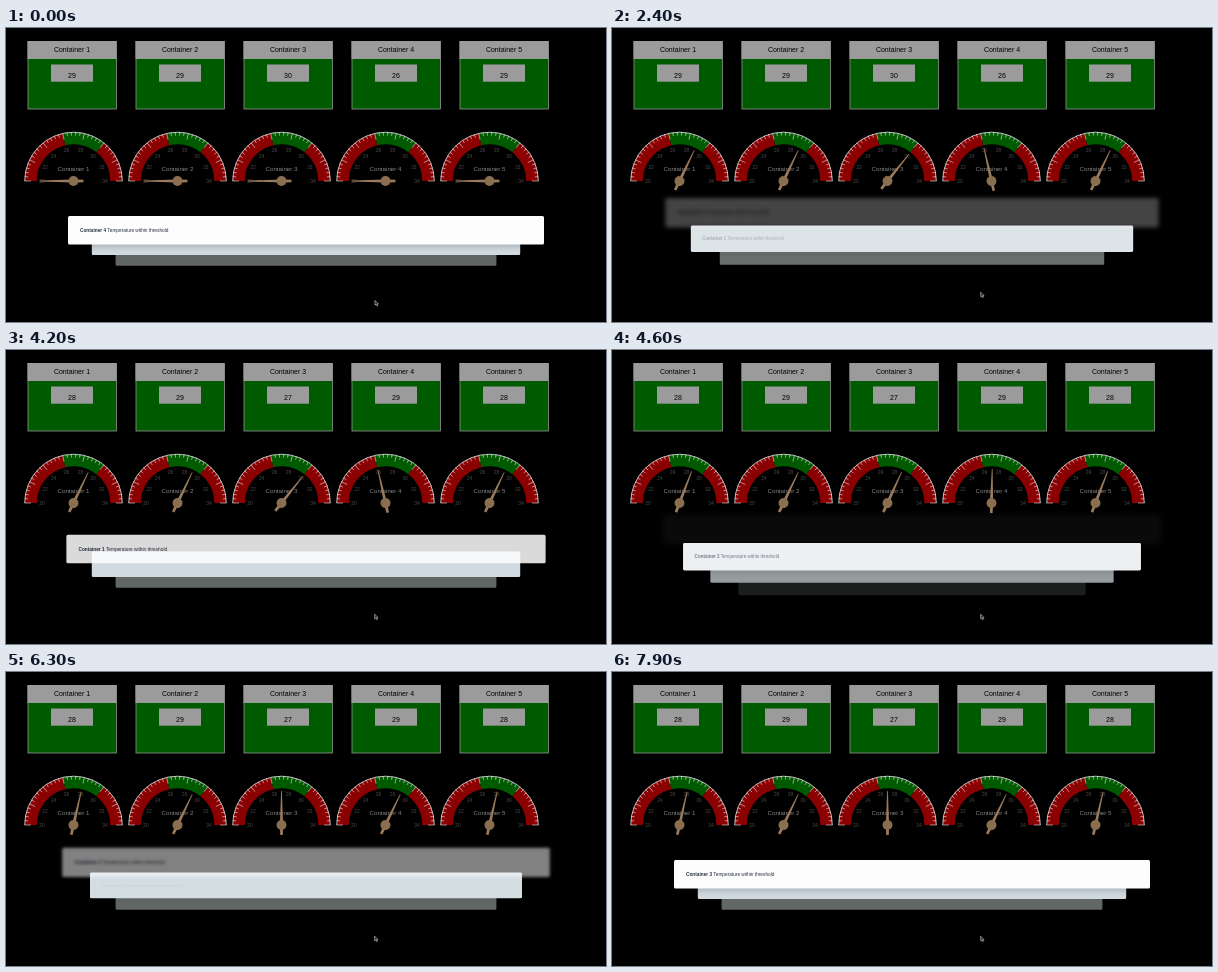
An HTML page for the animation above (8000 ms loop, 600x294 px).

```html
<!DOCTYPE html>
<html>
<head>
<meta charset="utf-8">
<title>Container temperatures</title>
<style>
  html, body { margin: 0; width: 100%; height: 100%; overflow: hidden; background: #000; }
  svg { display: block; width: 100%; height: 100%; font-family: "Liberation Sans", Arial, sans-serif; }
  .mid { text-anchor: middle; }
</style>
</head>
<body>
<svg id="stage" viewBox="0 0 600 294"></svg>
<script>
const LOOP = 8000, PERIOD = 2000;
const WAKE = 800;                          // needles leave their stop
const UPDATE = 4200, NEEDLE_TIME = 1100;   // second set of readings
const FIRST = [29, 29, 30, 26, 29], SECOND = [28, 29, 27, 29, 28];
const MIN = 20, MAX = 34, HUB_Y = 153;
const RANK_COLORS = [[253, 253, 253], [208, 218, 224], [96, 103, 101], [0, 0, 0]];

const clamp = x => Math.min(1, Math.max(0, x));
const mix = (a, b, p) => a + (b - a) * p;
const cubicOut = u => 1 - (1 - clamp(u)) ** 3;
const turn = value => (value - MIN) / (MAX - MIN) * 180;   // degrees from the left stop
const polar = (value, r) => {
  const a = turn(value) * Math.PI / 180;
  return [-r * Math.cos(a), -r * Math.sin(a)].map(n => n.toFixed(2));
};

function arc(from, to, r, color, width) {
  return `<path d="M${polar(from, r)}A${r},${r} 0 0 1 ${polar(to, r)}" fill="none" stroke="${color}" stroke-width="${width}"/>`;
}

function panel(i) {
  return `<g transform="translate(${21.5 + 108 * i} 13)">
    <rect x=".5" y=".5" width="88.5" height="67.5" fill="#005a00" stroke="#8f978f" stroke-width=".8"/>
    <rect width="89" height="18" fill="#9b9b9b"/>
    <rect x="23.5" y="23.5" width="42" height="17.2" fill="#9b9b9b"/>
    <text class="mid" x="44.5" y="11.2" font-size="7">Container ${i + 1}</text>
    <text class="mid reading" x="44.5" y="37" font-size="7"></text>
  </g>`;
}

function gauge(i) {
  let ticks = '', labels = '';
  for (let n = 0; n <= 35; n++) {
    const value = MIN + n * 0.4, major = n % 5 === 0;
    ticks += `M${polar(value, 49)}L${polar(value, major ? 42.5 : 45.5)}`;
    if (major) {
      const [x, y] = polar(value, 31.5);
      labels += `<text class="mid" x="${x}" y="${+y + 1.8}">${value}</text>`;
    }
  }
  return `<g transform="translate(${67.5 + 104 * i} ${HUB_Y})">
    ${arc(20, 26, 42.7, '#8b0000', 12)}${arc(26, 30, 42.7, '#005a00', 12)}${arc(30, 34, 42.7, '#8b0000', 12)}
    ${arc(20, 34, 48.8, '#e8e8e8', 0.8)}
    <path d="${ticks}" stroke="#e8e8e8" stroke-width=".6"/>
    <g font-size="5" fill="#4a4a4a">${labels}</g>
    <text class="mid" y="-10" font-size="6.2" fill="#888">Container ${i + 1}</text>
    <g class="needle" fill="#9a7b5b">
      <path d="M-34,-.4L0,-1.6L10,-1.3V1.3L0,1.6L-34,.4Z"/>
      <circle r="5" fill="#8b6d50"/>
    </g>
  </g>`;
}

const noteMarkup = `<g class="note">
  <rect x="-238" y="-14.25" width="476" height="28.5" rx="1.5"/>
  <text x="-226" y="1.7" font-size="4.75" fill="#2b3346"><tspan font-weight="bold"></tspan> Temperature within threshold</text>
</g>`;

const indices = [0, 1, 2, 3, 4];
const stage = document.getElementById('stage');
stage.innerHTML = indices.map(panel).join('') + indices.map(gauge).join('') + noteMarkup.repeat(4) +
  `<path id="cursor" d="M0,0V4.6L1.1,3.7L1.9,5.4L2.7,5L2,3.4H3.3Z" fill="#111" stroke="#ddd" stroke-width=".6"/>`;

const readings = [...stage.querySelectorAll('.reading')];
const needles = [...stage.querySelectorAll('.needle')];
const notes = [...stage.querySelectorAll('.note')].reverse();   // front note first
const cursor = document.getElementById('cursor');

function placeNote(note, { label, y, scale, color, textAlpha = 1, alpha = 1, blur = 0, shadow = 0 }) {
  note.setAttribute('transform', `translate(300 ${y}) scale(${scale})`);
  note.style.opacity = alpha;
  note.style.filter = blur ? `blur(${blur}px)` : shadow ? `drop-shadow(0 2px 3px rgba(0,0,0,${shadow}))` : 'none';
  const [rect, text] = note.children;
  rect.setAttribute('fill', `rgb(${color.map(Math.round)})`);
  text.style.opacity = textAlpha;
  text.firstChild.textContent = 'Container ' + label;
}

function drawNotes(t) {
  const step = Math.floor(t / PERIOD);
  const local = step > 0 ? t % PERIOD : t < WAKE ? 0 : PERIOD;
  const leave = cubicOut((local - 170) / 650);
  placeNote(notes[0], {
    label: (step + 3) % 5 + 1, y: 202.25 - 24 * leave, scale: 1 + 0.05 * leave,
    color: RANK_COLORS[0], alpha: 1 - leave, blur: 3 * leave, shadow: 0.2
  });
  for (let i = 1; i <= 3; i++) {
    const p = cubicOut((local - 170 - 100 * i) / 1200);
    const rank = i - p;
    placeNote(notes[i], {
      label: (step + 3 + i) % 5 + 1, y: 202.25 + 12 * rank, scale: 1 - 0.1 * rank,
      color: RANK_COLORS[i].map((c, k) => mix(c, RANK_COLORS[i - 1][k], p)),
      textAlpha: i === 1 ? p : 0, alpha: i === 3 ? clamp(p * 20) : 1, shadow: i === 1 ? 0.2 * p : 0
    });
  }
}

function draw(t) {
  const p = clamp((t - UPDATE) / NEEDLE_TIME);
  indices.forEach(i => {
    readings[i].textContent = (t < UPDATE ? FIRST : SECOND)[i];
    const value = t < WAKE ? MIN : mix(FIRST[i], SECOND[i], p);
    needles[i].setAttribute('transform', `rotate(${turn(value)})`);
  });
  drawNotes(t);
  cursor.setAttribute('transform', t < WAKE ? 'translate(369 272.5)' : 'translate(368.7 264.2)');
}

const start = performance.now();
function frame() {
  draw((performance.now() - start) % LOOP);
  requestAnimationFrame(frame);
}
frame();
</script>
</body>
</html>
```
